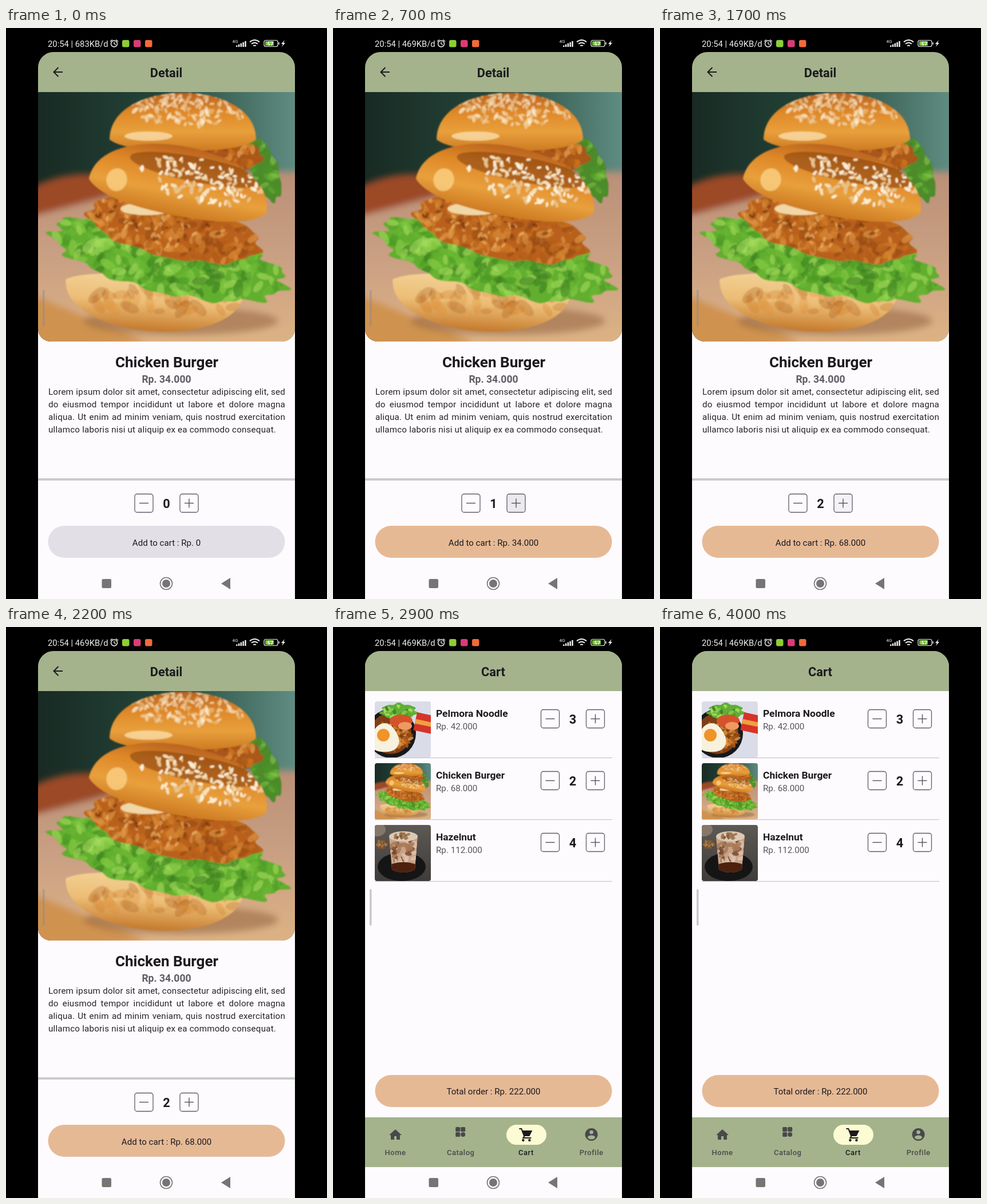
An HTML page for the animation above (4100 ms loop, 561 by 998 pixels).

```html
<!DOCTYPE html>
<html lang="en">
<head>
<meta charset="utf-8">
<title>Food order app</title>
<style>
  html, body { margin: 0; width: 100%; height: 100%; overflow: hidden; background: #000; }
  svg { display: block; font-family: Roboto, sans-serif; }
  p { margin: 0; font: 15.2px/22px Roboto, sans-serif; letter-spacing: .18px; text-align: justify; color: #252429; }
</style>
</head>
<body>
<svg id="stage" width="561" height="998"></svg>
<script>
const GREEN = '#a4b38c', PAPER = '#fefbff', INK = '#1b1a1e', PEACH = '#e6b995', GREY = '#757575', LIGHT = '#eee';
const LEFT = 56, WIDTH = 449, MIDDLE = 280.5;

let seed = 11;
const random = () => (seed = seed * 16807 % 2147483647) / 2147483647;
const pick = list => list[Math.floor(random() * list.length)];

const text = (x, y, s, size, { weight = 400, fill = INK, anchor = 'middle', extra = '' } = {}) =>
  `<text x="${x}" y="${y}" font-size="${size}" font-weight="${weight}" fill="${fill}" text-anchor="${anchor}" ${extra}>${s}</text>`;
const rect = (x, y, w, h, fill, r = 0, extra = '') =>
  `<rect x="${x}" y="${y}" width="${w}" height="${h}" rx="${r}" fill="${fill}" ${extra}/>`;
const oval = (x, y, rx, ry, fill, extra = '') =>
  `<ellipse cx="${x}" cy="${y}" rx="${rx}" ry="${ry}" fill="${fill}" ${extra}/>`;
const dot = (x, y, r, fill, extra) => oval(x, y, r, r, fill, extra);
const path = (d, fill, extra = '') => `<path d="${d}" fill="${fill}" ${extra}/>`;
const line = (d, stroke, width = 1.4) => path(d, 'none', `stroke="${stroke}" stroke-width="${width}"`);
const at = (x, y, inside, tilt = 0) => `<g transform="translate(${x} ${y}) rotate(${tilt})">${inside}</g>`;
const gradient = (id, colours, dir = 'x2="0" y2="1"') => `<linearGradient id="${id}" ${dir}>` +
  colours.map((c, i) => `<stop offset="${i / (colours.length - 1)}" stop-color="${c}"/>`).join('') + '</linearGradient>';

// Random specks in an oval region around a point.
function scatter(n, x, y, w, h, size, colours, opacity = .8) {
  let out = '';
  for (let i = 0; i < n; i++) {
    const a = random() * 2 * Math.PI, r = Math.sqrt(random()), s = size * (.6 + random() * .6);
    out += at((x + w * r * Math.cos(a)).toFixed(1), (y + h * r * Math.sin(a)).toFixed(1),
      oval(0, 0, s, s / 2, pick(colours), `opacity="${opacity}"`), random() * 180 | 0);
  }
  return out;
}
// An outline around the origin with its decoration clipped to it.
let clips = 0;
function shape(x, y, tilt, d, fill, inside = '') {
  const id = 'clip' + clips++;
  return at(x, y, `<clipPath id="${id}"><path d="${d}"/></clipPath>${path(d, fill)}<g clip-path="url(#${id})">${inside}</g>`, tilt);
}
const dome = (r, height, belly) =>
  `M${-r} 0C${-r} ${-height * 1.33} ${r} ${-height * 1.33} ${r} 0Q${r * .8} ${belly} 0 ${belly}T${-r} 0z`;
function frill(rx, ry, waves, depth) {
  const points = [];
  for (let i = 0; i < 160; i++) {
    const a = i / 80 * Math.PI, r = 1 + depth * (Math.sin(a * waves) + .7 * Math.sin(a * (2 * waves - 3)));
    points.push(`${(rx * r * Math.cos(a)).toFixed(1)} ${(ry * r * Math.sin(a)).toFixed(1)}`);
  }
  return `M${points.join('L')}z`;
}

const SESAME = ['#f7e2bd', '#fff2d8', '#e9c38c'], LEAF = ['#8fd04a', '#a9df62', '#4c9a26', '#3a7d1e', '#6cbb35'];
const CRUST = ['#d98832', '#964812', '#e09a48', '#ad5a18', '#c8701f'];

const burger = `<symbol id="burger" viewBox="0 0 449 436" preserveAspectRatio="xMidYMid slice">
  ${rect(0, 0, 449, 436, 'url(#leafy)')}
  <g filter="url(#soft)">
    ${shape(50, 185, -12, frill(90, 38, 2, 0), '#9c4827')}
    ${path('M-20 220L300 135 470 140V460H-20z', 'url(#board)')}
    ${path('M-20 350L190 436-20 460z', '#cf934f')}
    ${oval(250, 400, 170, 25, '#8d5f3c', 'opacity=".5"')}
  </g>
  <g filter="url(#fine)">
    ${shape(395, 135, 70, frill(58, 24, 7, .05), '#4d8b2c', scatter(30, 0, 0, 58, 24, 9, LEAF, .4))}
    ${shape(330, 112, 0, frill(62, 28, 6, .04), '#a9561d', scatter(40, 0, 0, 62, 28, 9, CRUST))}
    ${shape(253, 83, 0, dome(128, 82, 20), 'url(#crown)',
      oval(-60, -6, 42, 8, '#ffe8ba', 'opacity=".7"') + scatter(150, 10, -55, 110, 30, 6, SESAME, .6))}
    ${shape(204, 338, 4, dome(156, -80, -18), 'url(#heel)', scatter(40, 0, 25, 150, 20, 16, CRUST, .25))}
    ${oval(245, 341, 45, 14, '#bd4526')}
    ${shape(229, 290, 13, frill(207, 62, 13, .045), '#62ae2e', scatter(260, 0, 0, 205, 60, 14, LEAF, .55))}
    ${shape(238, 240, 12, frill(153, 50, 9, .035), '#b9611d',
      scatter(230, 0, 0, 150, 50, 11, CRUST, .6) + scatter(60, -30, -5, 120, 40, 5, ['#f2bd6e', '#6e300b'], .6))}
    ${oval(190, 204, 46, 11, '#f1d7a5')}
    ${shape(244, 182, 11, dome(158, 88, 34), 'url(#crown)',
      oval(25, -52, 120, 22, '#84400f', 'opacity=".55"') + oval(-110, -8, 18, 20, '#ffd98f', 'opacity=".7"') +
      scatter(120, 35, -35, 110, 38, 5.5, SESAME, .95))}
  </g></symbol>`;

const noodle = `<symbol id="noodle" viewBox="0 0 98 98">
  ${rect(0, 0, 98, 98, '#dadde8')}${dot(29, 56, 43, '#17191a')}${dot(28, 56, 36, '#7e3f18')}
  ${scatter(90, 36, 58, 28, 28, 5, CRUST)}
  ${shape(42, 18, 0, frill(31, 14, 7, .08), '#5fae35', scatter(20, 0, 0, 28, 12, 5, LEAF))}
  ${oval(46, 34, 20, 11, '#d6522b')}${oval(53, 43, 12, 7, '#ee9962')}
  ${at(86, 40, rect(-16, -18, 36, 32, '#d53429') + rect(-16, -6, 36, 8, '#f0a040'), 12)}
  ${shape(17, 65, 0, frill(25, 25, 3, .04), '#f7f1dd')}${dot(15, 59, 11, '#ee9428')}</symbol>`;

const coffee = `<symbol id="coffee" viewBox="0 0 98 98">
  ${rect(0, 0, 98, 98, 'url(#slate)')}${oval(3, 8, 16, 12, '#85776a')}${scatter(16, 12, 34, 9, 7, 4, CRUST, .5)}
  ${oval(47, 73, 42, 25, '#151516')}
  ${shape(50, 48, 0, 'M-25-28H25L20 30Q0 40-20 30z', '#c7a388',
    scatter(30, 0, -2, 24, 22, 7, ['#dfc4ae', '#75472c', '#a87855']) + oval(0, 30, 30, 13, '#4d210e'))}
  ${oval(50, 20, 25, 9, '#dcc9b4')}${scatter(12, 50, 20, 14, 5, 5, ['#986a40', '#705035'])}</symbol>`;

function stepper(minusX, x, plusX, y, value, id = '') {
  const box = cx => rect(cx - 16, y - 16, 32, 32, 'none', 4, 'stroke="#5f5d67" stroke-width="1.3"') +
    line(`M${cx - 8} ${y}h16`, '#55535c');
  return box(minusX) + box(plusX) + line(`M${plusX} ${y - 8}v16`, '#55535c') +
    text(x, y + 8, value, 21.8, { weight: 700, extra: id && `id="${id}"` });
}

const cartRow = ([name, price, count, art], i) => at(73, 130 + 108 * i,
  `<g clip-path="url(#thumb)"><use href="#${art}" width="98" height="98"/></g>` +
  text(107, 27, name, 17.4, { weight: 700, anchor: 'start' }) +
  text(107, 49, price, 15.2, { fill: '#56545b', anchor: 'start' }) +
  stepper(306.5, 346, 385.5, 30.5, count) + rect(0, 98, 415, 1.2, '#c8c5ca'));

const header = title => rect(LEFT, 42, WIDTH, 60, GREEN, 27) + rect(LEFT, 72, WIDTH, 40, GREEN) +
  text(280, 85.5, title, 21.8, { weight: 700 });
const button = (y, extra) => rect(73.5, y, 414, 56, PEACH, 28, extra);

// Tab icons are drawn around their own centre.
const tabIcons = {
  Home: c => path('M0-9L11 1H8V9H2V3H-2V9H-8V1H-11z', c),
  Catalog: c => [[-9, -13], [0, -13], [-9, -4]].map(([x, y]) => rect(x, y, 8, 8, c, 1.5)).join('') + dot(4, 0, 4, c),
  Cart: c => path('M-8-7H11L6 3H-4z', c) + line('M-12-10H-8L-3 3-5 6H9', c, 2) + dot(-5, 10, 2.2, c) + dot(6, 10, 2.2, c),
  Profile: c => dot(0, 0, 11, c) + dot(0, -4, 3.3, GREEN) + oval(0, 5, 6.5, 3.4, GREEN)
};
const tabs = Object.keys(tabIcons).map((name, i) => {
  const x = 109 + 114.2 * i, fill = name === 'Cart' ? INK : '#48494a';
  return at(x, 887, tabIcons[name](fill)) + text(x, 923, name, 13, { weight: 500, fill, extra: 'letter-spacing=".5"' });
}).join('');

const statusBar = text(73, 32.5, '', 14.8, { fill: LIGHT, anchor: 'start', extra: 'id="speed"' }) +
  at(189, 27.5, dot(0, 0, 5.5, 'none', `stroke="${LIGHT}" stroke-width="1.5"`) + line('M0-3V0L3 2M-7-4L-3-7M7-4L3-7', LIGHT)) +
  ['#8dce35', '#d93c76', '#f06b38'].map((c, i) => rect(203 + 20 * i, 21, 12.5, 12.5, c, 3)).join('') +
  text(400.5, 25.5, '4G', 8, { fill: LIGHT }) +
  [0, 1, 2, 3, 4].map(i => rect(402 + i * 3.8, 30.5 - i * 1.9, 2.5, 2.5 + i * 1.9, LIGHT)).join('') +
  [0, 1, 2].map(i => line(`M${426 + 3 * i} ${24.5 + 3.2 * i}q${8.5 - 3 * i} ${3 * i - 7} ${17 - 6 * i} 0`, LIGHT, 2)).join('') +
  rect(451, 21.5, 24, 11, 'none', 3, `stroke="${LIGHT}" stroke-width="1.2"`) + rect(453, 23, 15, 8, '#72c52e', 1) +
  text(462, 30.5, '57', 9, { weight: 700, fill: '#fff' }) + line('M477 25v4', LIGHT) +
  path('M487 21l-6 7h3l-2 5 6-7h-3z', LIGHT);

const systemKeys = rect(LEFT, 944, WIDTH, 54, PAPER) + rect(167.5, 963, 16.5, 16, GREY, 2.5) +
  dot(280, 971, 10.5, 'none', `stroke="${GREY}" stroke-width="1.6"`) + dot(280, 971, 7, GREY) + path('M376 971l16-10v20z', GREY);

const $ = id => document.getElementById(id);
$('stage').innerHTML = `<defs>
  ${gradient('leafy', ['#182a23', '#25463a', '#5f8c82'], '')}
  ${gradient('board', ['#b98f76', '#cba184', '#dfb584'])}
  ${gradient('crown', ['#b9631f', '#df8828', '#e8a03c', '#cd7a22'])}
  ${gradient('heel', ['#f3d296', '#ecbd76', '#c57a2c'])}
  ${gradient('slate', ['#5d5954', '#3e3c3b'])}
  <filter id="soft"><feGaussianBlur stdDeviation="6"/></filter>
  <filter id="fine"><feGaussianBlur stdDeviation="1"/></filter>
  <clipPath id="thumb">${rect(0, 0, 98, 98, '', 4)}</clipPath>
  <clipPath id="photo">${rect(LEFT, 80, WIDTH, 468, '', 22)}</clipPath>
  ${burger}${noodle}${coffee}</defs>
  ${rect(LEFT, 112, WIDTH, 886, PAPER)}${statusBar}
  <g clip-path="url(#photo)"><use href="#burger" x="${LEFT}" y="112" width="${WIDTH}" height="436"/></g>
  ${header('Detail')}${line('M99 77H84M91.500 69l-8 8 8 8', INK, 2)}
  ${text(281, 593, 'Chicken Burger', 26.1, { weight: 700 })}
  ${text(MIDDLE, 620, 'Rp. 34.000', 17.6, { weight: 700, fill: '#5f5d64' })}
  <foreignObject x="74" y="625" width="414" height="100"><p>Lorem ipsum dolor sit amet, consectetur adipiscing elit, sed do eiusmod tempor incididunt ut labore et dolore magna aliqua. Ut enim ad minim veniam, quis nostrud exercitation ullamco laboris nisi ut aliquip ex ea commodo consequat.</p></foreignObject>
  <g id="order">
    ${rect(LEFT, 787, WIDTH, 160, PAPER)}${rect(LEFT, 787, WIDTH, 4, '#cbcacc')}
    ${rect(304, 814.5, 32, 32, '#d6d3dc', 4, 'id="press"')}${stepper(241, MIDDLE, 320, 830.5, 0, 'count')}
    ${button(870, 'id="button"')}${text(MIDDLE, 904.5, '', 15.1, { extra: 'id="label"' })}
  </g>
  <g id="cart">${rect(LEFT, 112, WIDTH, 745, PAPER)}${header('Cart')}
    ${[['Pelmora Noodle', 'Rp. 42.000', 3, 'noodle'], ['Chicken Burger', 'Rp. 68.000', 2, 'burger'], ['Hazelnut', 'Rp. 112.000', 4, 'coffee']].map(cartRow).join('')}
    ${button(783)}${text(MIDDLE, 817, 'Total order : Rp. 222.000', 15.1)}
  </g>
  <g id="nav">${rect(LEFT, 857, WIDTH, 87, GREEN)}${rect(303, 870, 70, 35, '#fdfbd3', 17.5, 'id="pill"')}${tabs}</g>
  ${systemKeys}${rect(64, 458, 3.5, 64, '#85878f', 1.7, 'opacity=".45"')}`;

const set = (id, attrs) => Object.entries(attrs).forEach(([k, v]) => $(id).setAttribute(k, v));
const progress = (t, from, length) => Math.min(1, Math.max(0, (t - from) / length));
const PRESSES = [600, 1400], NAVIGATE = 2250;

function draw(now) {
  const t = Math.floor(now % 4100 / 100) * 100;
  const taps = PRESSES.filter(p => t >= p), count = taps.length;
  const moved = t >= NAVIGATE, grow = progress(t, 2280, 280);
  $('speed').textContent = `20:54 | ${count ? 469 : 683}KB/d`;
  $('count').textContent = count;
  $('label').textContent = `Add to cart : Rp. ${count ? count * 34 + '.000' : 0}`;
  set('button', { fill: count ? PEACH : '#e2dfe7' });
  set('press', { opacity: count ? .6 * (1 - progress(t, taps[count - 1], 500)) : 0 });
  set('order', { transform: `translate(0 ${moved ? -87 : 0})` });
  set('cart', { opacity: progress(t, NAVIGATE, 220) });
  set('nav', { opacity: +moved });
  set('pill', { x: 338 - 35 * grow, width: 70 * grow, opacity: grow });
  requestAnimationFrame(draw);
}
requestAnimationFrame(draw);
</script>
</body>
</html>
```
